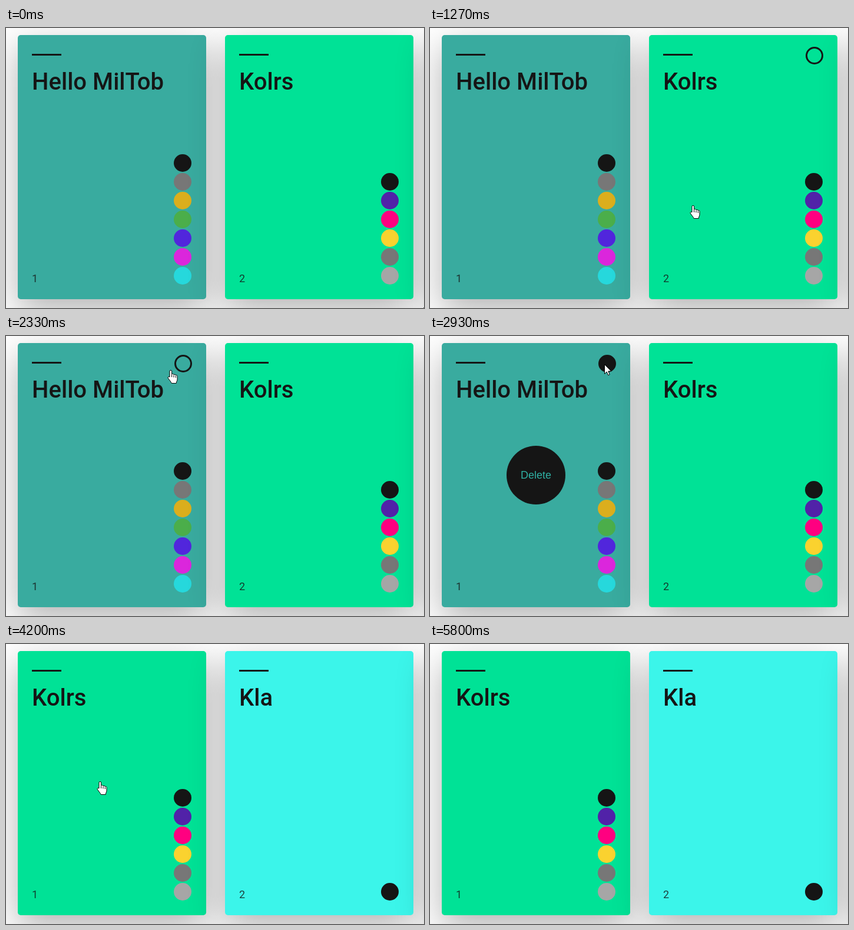
These frames come from a looping animation (710x477 px, 6.94 s). An HTML page:

```html
<!DOCTYPE html>
<html lang="en">
<head>
<meta charset="utf-8">
<title>Palette cards</title>
<style>
html, body { margin: 0; width: 100%; height: 100%; overflow: hidden; background: #fff; }
#stage { position: relative; width: 710px; height: 477px; overflow: hidden; color: #151515; font-family: Roboto, sans-serif; }
#cards { position: absolute; left: 20px; top: 12px; display: flex; gap: 32px; counter-reset: card; }
.card { position: relative; flex: none; width: 320px; height: 450px; border-radius: 5px; counter-increment: card; box-shadow: 0 20px 60px rgba(0,0,0,.3); }
.card > * { position: absolute; }
.bar { left: 24px; top: 32px; width: 50px; height: 3px; background: #151515; }
h2 { left: 24px; top: 56px; margin: 0; font: 500 40px/48px Roboto, sans-serif; white-space: nowrap; }
.num { left: 24px; top: 405px; font-size: 18px; line-height: 20px; opacity: .8; }
.num::before { content: counter(card); }
.dots { left: 265px; bottom: 25px; display: grid; gap: 2px; }
.dots i { width: 30px; height: 30px; border-radius: 50%; }
.ring { left: 266px; top: 20px; width: 24px; height: 24px; border: 3px solid #151515; border-radius: 50%; }
.delete { left: 110px; top: 175px; width: 100px; border-radius: 50%; background: #151515; color: #2fb1a4; font: 18px/100px "Liberation Sans", Arial, sans-serif; text-align: center; }
svg { position: absolute; left: 0; top: 0; }
#cursor path { fill: #fff; stroke: #000; stroke-linejoin: round; }
</style>
</head>
<body>
<div id="stage">
  <div id="cards"></div>
  <svg width="710" height="477">
    <g id="cursor">
      <path id="arrow" d="M.5 .5V16.5L4.2 13l2.5 5.8 2.5-1.1L6.8 12H11.8Z"/>
      <path id="hand" d="M-2 2.2a1.8 1.8 0 0 1 3.6 0V7.5a1.8 1.8 0 0 1 3.4.8a1.8 1.8 0 0 1 3.3.8a1.6 1.6 0 0 1 2.7 1.2V16q0 2-1.2 3.6l-.6 2.9H1.2l-.8-1.8-5-6.8a1.6 1.6 0 0 1 2.6-1.9ZM1.6 8v4M5 9v3.5M8.3 10v3"/>
    </g>
  </svg>
</div>
<script>
const LOOP = 6940, FPS = 15;
const $ = id => document.getElementById(id);

const palettes = [
  ['Hello MilTob', '#39ab9f', '#151515 #777 #dbae1d #4bae4a #5126dc #db26dc #26d8dc'],
  ['Kolrs', '#00e296', '#151515 #5122a8 #ff0080 #fad22f #777 #a6a6a6'],
  ['Kla', '#3bf5ea', '#151515'],
  ['', '#3bf5ea', '#151515']
];
$('cards').innerHTML = palettes.map(([name, bg, dots]) => `
  <div class="card" style="background:${bg}">
    <div class="bar"></div><h2>${name}</h2><div class="num"></div>
    <div class="dots">${dots.split(' ').map(c => `<i style="background:${c}"></i>`).join('')}</div>
    <div class="ring" hidden></div><div class="delete" hidden>Delete</div>
  </div>`).join('');
const cards = [...document.querySelectorAll('.card')];
const rings = cards.map(c => c.querySelector('.ring'));
const deleteButton = cards[0].querySelector('.delete');

const mix = (a, b, k) => a.map((v, i) => v + (b[i] - v) * k);

// Places the pointer visits
const corner = [709, 476], entry = [680, 467], edge = [319, 212],
      ring = [296, 48], button = [160, 234], exit = [21, 468];

// Quadratic curve from a to b, bent towards c
function glide(k, a, b, c = mix(a, b, 0.5)) {
  return mix(mix(a, c, k), mix(c, b, k), k);
}

function pointer(step) {
  const part = (from, to) => Math.min(1, Math.max(0, (step - from) / (to - from)));
  if (step < 13) return corner;
  if (step < 25) return glide(1 - (1 - part(13, 25)) ** 1.5, entry, edge);
  if (step < 46) return glide(part(25, 39), edge, ring, [253, 40]);
  if (step < 77) return glide(part(46, 54), ring, button);
  return glide(part(77, 86), button, exit);
}

const over = (x, y, left) => x >= left && x < left + 320 && y >= 12 && y < 462;
const show = (el, on) => { el.style.display = on ? '' : 'none'; };

function draw(t) {
  const step = Math.floor(t * FPS / 1000 + 0.1);
  const [x, y] = pointer(step).map(Math.round);
  const gone = step >= 63, armed = step >= 36;
  const onRing = armed && Math.hypot(x - 301, y - 47) < 15;
  const hand = !onRing && (over(x, y, 20) || over(x, y, 372));

  show(cards[0], !gone);
  rings[0].hidden = step < 24;
  rings[0].style.background = armed ? '#151515' : 'none';
  rings[1].hidden = gone || !over(x, y, 372);
  deleteButton.hidden = step < 44;

  show($('hand'), hand);
  show($('arrow'), !hand);
  show($('cursor'), step < 87);
  $('cursor').setAttribute('transform', `translate(${x} ${y})`);
}

function tick() {
  draw(performance.now() % LOOP);
  requestAnimationFrame(tick);
}
tick();
</script>
</body>
</html>
```
